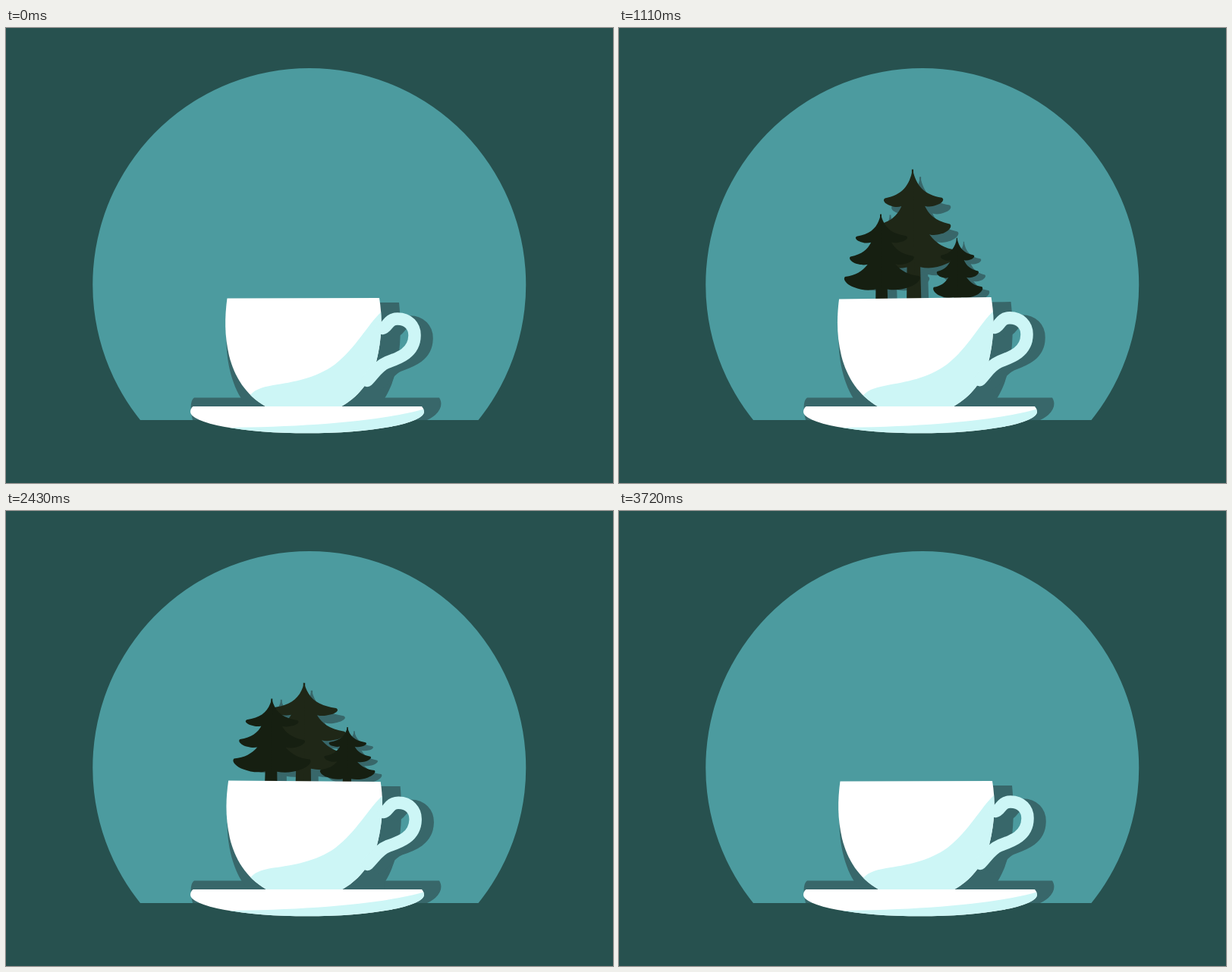
Recreate the animation shown at these times as an HTML page. Size 800x600 px, loop 3750 ms.

```html
<!DOCTYPE html>
<html lang="en">
<head>
<meta charset="utf-8">
<title>Forest in a cup</title>
<style>
html, body { margin: 0; width: 100%; height: 100%; overflow: hidden; background: #27514f; }
svg { display: block; width: 100%; height: 100%; }
.shade { fill: #38676a; }
.pale { fill: #cdf6f6; }
.handle { fill: none; stroke: #cdf6f6; stroke-width: 16.5; stroke-linecap: round; stroke-linejoin: round; }
#steam { fill: none; stroke: #38676a; stroke-width: 12.5; stroke-linecap: round; }
</style>
</head>
<body>
<svg viewBox="0 0 800 600">
  <defs>
    <path id="half" d="M-1 0H0C4 16 13 25 34 28C38 30 34 34 27 35.500C22 37 18 37 14 36C19 45 27 51 43 54C47 56 41 62 33 63.500C27 65 23 65 19 64C27 73 36 78 51 79.500C55 83 48 90 39 93C28 97 18 98 8 96L9 140H-1Z"/>
    <g id="tree"><use href="#half"/><use href="#half" transform="scale(-.96 1)"/></g>
    <path id="body" d="M291.5 356.5L492 356C496 380 496 408 488 440C480 468 463 487 442 499L420 510H364L342 499C316 484 301 460 294 432C288 406 288 382 291.5 356.5Z"/>
    <path id="grip" d="M496 396C503 395 503 383.500 516 383.500C530 383.500 539 393 538.500 406C538 428 519 435 502 441C490 446 485 456 476 465"/>
    <path id="dish" d="M246.500 499H548Q551 502 551 506A154 28.300 0 0 1 243 506Q243 502 246.500 499Z"/>
    <path id="wisp" pathLength="100" d="M354 316C354 300 338 298 338 278S357 252 356 236C356 226 353 222 353 212"/>
    <clipPath id="inBody"><use href="#body"/></clipPath>
    <clipPath id="inDish"><use href="#dish"/></clipPath>
    <clipPath id="aboveRim"><rect x="200" y="100" width="400" height="259"/></clipPath>
  </defs>

  <rect width="800" height="600" fill="#27514f"/>
  <path d="M177 517A285.500 285.500 0 1 1 622.500 517Z" fill="#4c9b9f"/>

  <g id="steam">
    <use href="#wisp"/>
    <use href="#wisp" x="44.500"/>
    <use href="#wisp" x="89"/>
  </g>

  <path class="shade" d="M248 487.500H571C577 497 572 509 555 517H246C243 505 242 492 248 487.500Z"/>
  <g id="cast">
    <path class="shade" d="M480 362H518C522 400 521 455 498 490V499H318C300 480 288 440 291 400Z"/>
    <use href="#grip" class="handle" x="16" y="4" style="stroke:#38676a"/>
  </g>

  <g id="cup">
    <g clip-path="url(#aboveRim)">
      <g id="shadows" class="shade"></g>
      <g id="trees"></g>
    </g>
    <use href="#body" fill="#fff"/>
    <g clip-path="url(#inBody)">
      <path class="pale" d="M500 370C480 384 464 420 433 444C408 462 378 467 352 471C336 474 326 477 320 487V515H500Z"/>
    </g>
    <use href="#grip" class="handle"/>
  </g>

  <use href="#dish" fill="#fff"/>
  <g clip-path="url(#inDish)">
    <path class="pale" d="M556 501C500 518 400 526 290 527V540H556Z"/>
  </g>
</svg>
<script>
const LOOP = 3750;
const HIDDEN = 385; // tip height of a tree inside the cup
const BASE = 478;   // fixed foot while a tree bobs
const $ = id => document.getElementById(id);
const clamp = v => Math.max(0, Math.min(1, v));

// Tree tips rest at (x, rest); each rises at "up" and sinks at "down"
const trees = [
  { x: 390, rest: 219.5, size: 1.215, bob: 9, up: 900, down: 2400, color: '#1f2717', dx: 10, dy: 10 },
  { x: 347.5, rest: 248, size: 1, bob: 0, up: 695, down: 2500, color: '#161f11', dx: 12.5, dy: 1 },
  { x: 447.6, rest: 284.5, size: .71, bob: 0, up: 950, down: 2430, color: '#161f11', dx: 9, dy: 5 }
];

function addTree(parent) {
  const el = document.createElementNS('http://www.w3.org/2000/svg', 'use');
  el.setAttribute('href', '#tree');
  return parent.appendChild(el);
}
for (const tree of trees) {
  tree.shadow = addTree($('shadows'));
  tree.el = addTree($('trees'));
  tree.el.setAttribute('fill', tree.color);
}

// Damped spring from 0 to 1
const spring = d => d <= 0 ? 0 : 1 - Math.exp(-d / 181) * Math.cos(Math.PI * d / 290);
// Pulls back, then runs from 0 to 1
const backIn = u => u * u * (3 * u - 2);

// Cup angles at even steps, joined by a smooth curve
const SWAY = { start: 750, step: 210, poses: [0, -2.2, .3, 2.8, .8, -1, .2, .5, .6, 1.4, -3, .5, 3, 1.5, 0] };

function tilt(t) {
  const at = i => SWAY.poses[i] || 0;
  const pos = (t - SWAY.start) / SWAY.step;
  const i = Math.floor(pos), u = pos - i;
  if (i < 0 || i >= SWAY.poses.length - 1) return 0;
  const [a, b, c, d] = [at(i - 1), at(i), at(i + 1), at(i + 2)];
  return b + u / 2 * (c - a + u * (2 * a - 5 * b + 4 * c - d + u * (3 * (b - c) + d - a)));
}

function drawSteam(t) {
  const head = 100 * clamp((t - 180) / 660);
  const tail = 100 * clamp((t - 380) / 500);
  const on = t >= 180 && t < 880;
  $('steam').setAttribute('opacity', on ? .5 * clamp((930 - t) / 260) : 0);
  $('wisp').setAttribute('stroke-dasharray', `0 ${tail} ${Math.max(.01, head - tail)} 300`);
}

function drawTree(t, { x, rest, size, bob, up, down, dx, dy, el, shadow }) {
  const home = rest + bob * Math.cos(2 * Math.PI * (t - 1350) / 1000);
  const out = spring(t - up) - backIn(clamp((t - down) / 630));
  const y = HIDDEN + (home - HIDDEN) * out;
  const stretch = (BASE - home) / (BASE - rest) + .4 * Math.exp(-Math.max(0, t - up) / 160);
  const scale = `scale(${size / Math.pow(stretch, .8)} ${size * stretch})`;
  el.setAttribute('transform', `translate(${x} ${y}) ${scale}`);
  shadow.setAttribute('transform', `translate(${x + dx} ${y + dy}) ${scale}`);
}

function draw(t) {
  const angle = tilt(t);
  drawSteam(t);
  $('cup').setAttribute('transform', `rotate(${angle} 392 514)`);
  $('cast').setAttribute('transform', `rotate(${angle} 418 520)`);
  trees.forEach(tree => drawTree(t, tree));
}

const start = performance.now();
function tick() {
  draw((performance.now() - start) % LOOP);
  requestAnimationFrame(tick);
}
tick();
</script>
</body>
</html>
```
